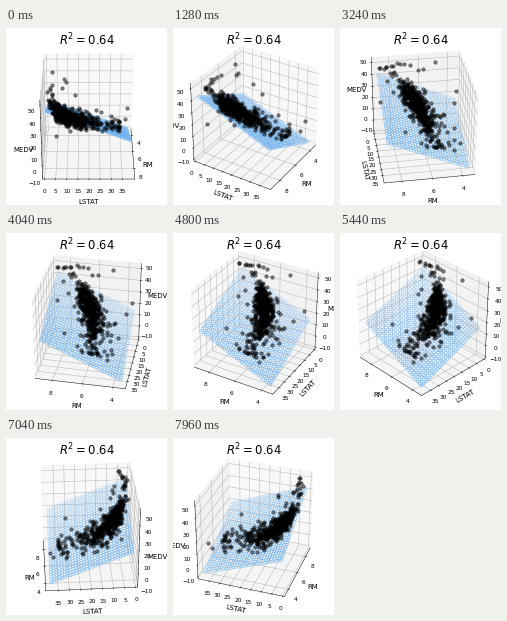
Animation of 161 by 177 pixels, one loop 8 s. Source, as a matplotlib script:

```python
import numpy as np
import matplotlib.pyplot as plt
from matplotlib.animation import FuncAnimation

W, H, DPI = 161, 177, 42
FRAMES, INTERVAL = 200, 40


def plane(rm, lstat):
    return -1.358 + 5.095 * rm - 0.642 * lstat


def make_data(n=486):
    """Housing-like sample: rooms, lower-status share, median value."""
    rng = np.random.default_rng(5)
    log_l = np.clip(rng.normal(2.37, 0.6, n), np.log(1.9), np.log(34))
    d = log_l - 2.37
    spread = np.where(rng.random(n) < 0.2, 0.75, 0.36)
    rm = 6.25 - 0.56 * d + 0.2 * d**2 * (d < 0) + rng.normal(0, 1, n) * spread
    rm = np.clip(rm, 4.6, 8.5)
    medv = (20.6 - 8.6 * d + 4.2 * (rm - 6.28)
            + 3.0 * np.clip(rm - 6.8, 0, 2) ** 2 + rng.normal(0, 3.4, n))
    extra = np.array([
        (3.56, 7.1, 27.5), (3.86, 13.3, 23.1), (4.14, 38.0, 13.8),
        (4.14, 23.3, 11.9), (4.37, 30.6, 8.8), (4.52, 37.0, 7.0),
        (4.97, 3.3, 50), (5.88, 8.9, 50), (6.22, 9.5, 50), (6.68, 3.7, 50),
        (7.02, 3.0, 50), (7.3, 2.9, 50), (7.8, 3.8, 50), (7.93, 3.7, 50),
        (8.27, 4.1, 50), (8.7, 5.1, 50), (8.73, 4.6, 50), (8.78, 5.3, 21.9),
        (7.49, 1.7, 50), (8.4, 3.3, 48),
    ])
    body = np.column_stack([rm, np.exp(log_l), np.clip(medv, 5, 50)])
    return np.vstack([body, extra]).T


def padded(lo, hi):
    """Data margin of 5 %, then the small gap to the panes."""
    m = 0.05 * (hi - lo)
    lo, hi = lo - m, hi + m
    gap = (hi - lo) / 48
    return lo - gap, hi + gap


RM, LSTAT = (3.561, 8.78), (1.73, 37.97)

fig = plt.figure(figsize=(W / DPI, H / DPI), dpi=DPI, facecolor="white")
ax = fig.add_axes([0, 6.8 / H, 1, W / H], projection="3d")
ax.patch.set_visible(False)

ax.plot(*make_data(), color="k", zorder=15, linestyle="none",
        marker="o", alpha=0.5)
gx, gy = np.meshgrid(np.linspace(*RM, 30), np.linspace(*LSTAT, 30))
gx, gy = gx.ravel(), gy.ravel()
ax.scatter(gx, gy, plane(gx, gy), facecolor=(0, 0, 0, 0), s=20,
           edgecolor="#70b3f0")

ax.set_xlim(*padded(*RM))
ax.set_ylim(*padded(*LSTAT))
ax.set_zlim(*padded(plane(RM[0], LSTAT[1]), 50))
ax.set_xticks([4, 6, 8])
ax.set_yticks(range(0, 36, 5))
ax.set_zticks(range(-10, 51, 10))
ax.set_xlabel("RM", fontsize=12)
ax.set_ylabel("LSTAT", fontsize=12)
ax.set_zlabel("MEDV", fontsize=12)
ax.set_box_aspect((1, 1, 1), zoom=0.9468)
fig.suptitle("$R^2 = 0.64$", fontsize=20)


def update(i):
    # one degree per step; the offset avoids ties when picking axis sides
    ax.view_init(elev=32, azim=i + 0.02)
    return []


anim = FuncAnimation(fig, update, frames=FRAMES, interval=INTERVAL,
                     init_func=lambda: update(0), repeat=True,
                     repeat_delay=0, blit=False)
plt.show()
```
